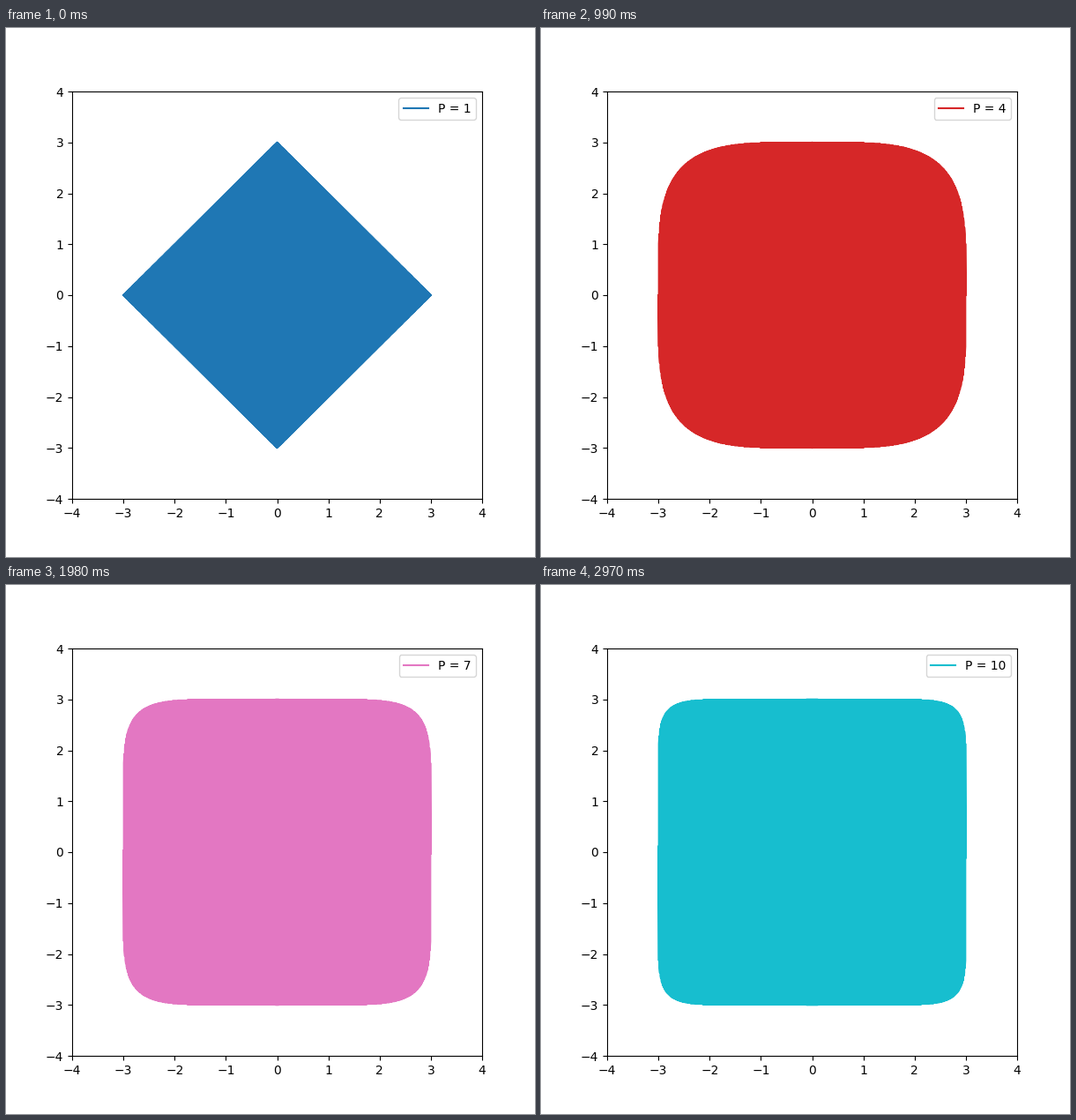
These frames come from a looping animation (600 px wide and 600 px high, 3300 ms). A matplotlib script:

```python
import matplotlib.pyplot as plt
import numpy as np
from matplotlib.animation import FuncAnimation

RADIUS = 3
POWERS = range(1, 11)
GRID = np.arange(-300, 301) / 100

plt.rcParams["font.family"] = "DejaVu Sans"
fig, ax = plt.subplots(figsize=(6, 6), dpi=100)


def ball_path(p):
    """Sweep the grid points of the L^p ball column by column."""
    powers = np.abs(GRID) ** p
    limit = RADIUS ** p * (1 + 1e-14)
    xs, ys = [], []
    for i, x in enumerate(GRID):
        column = GRID[powers[i] + powers <= limit]
        if len(column) == 0:
            continue
        ends = [column[0], column[-1]]
        if i % 2 == 0:
            ends.reverse()
        xs += [x, x]
        ys += ends
    return xs, ys


def draw(frame):
    p = POWERS[frame]
    ax.clear()
    ax.set_xlim(-4, 4)
    ax.set_ylim(-4, 4)
    ax.plot(*ball_path(p), color=f"C{frame}", label=f"P = {p}")
    ax.legend(loc="upper right")
    return ax.get_children()


anim = FuncAnimation(fig, draw, frames=len(POWERS), interval=330, repeat=True)
plt.show()
```
